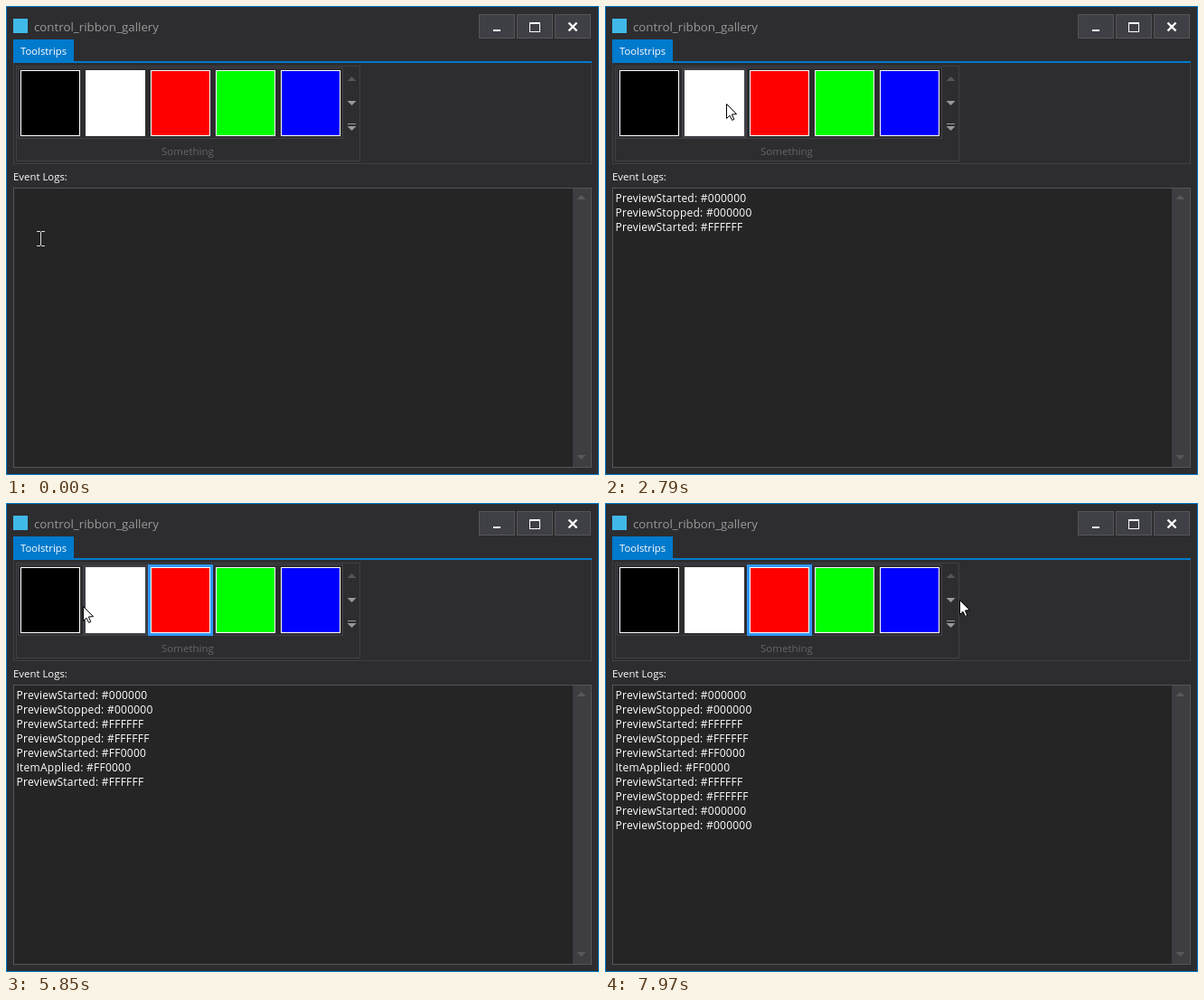
These frames come from a looping animation (656 by 519 pixels, 8000 ms). An HTML page with a canvas:

```html
<!DOCTYPE html>
<html lang="en">
<head>
<meta charset="utf-8">
<title>control_ribbon_gallery</title>
<style>
  html, body { margin: 0; width: 100%; height: 100%; overflow: hidden; background: #2d2d30; }
  canvas { display: block; }
</style>
</head>
<body>
<canvas id="stage" width="656" height="519"></canvas>
<script>
const ctx = document.getElementById('stage').getContext('2d');
const LOOP = 8000;
const BLUE = '#007acc', EDGE = '#3f3f46', BACK = '#2d2d30';
const SWATCHES = ['#000000', '#ffffff', '#ff0000', '#00ff00', '#0000ff'];
const APPLY_TIME = 3730, APPLIED = 2;

// Pointer moves: first step, last step, step count, end point, optional curve control
const START = { x: 38, y: 257 };
const MOVES = [
  { from: 620, to: 1060, steps: 12, x: 49, y: 114 },
  { from: 1660, to: 1980, steps: 9, x: 118, y: 107 },
  { from: 2170, to: 2170, steps: 1, x: 119, y: 108 },
  { from: 2630, to: 3080, steps: 12, x: 189, y: 109 },
  { from: 4140, to: 4140, steps: 1, x: 187, y: 109 },
  { from: 4320, to: 4970, steps: 17, x: 131, y: 110 },
  { from: 5570, to: 6170, steps: 16, x: 39, y: 117 },
  { from: 6590, to: 7370, steps: 18, x: 329, y: 248 },
  { from: 7410, to: 7970, steps: 15, x: 392, y: 107, control: { x: 445, y: 170 } }
];

// Log entries; hover is the swatch being previewed from then on
const EVENTS = [
  { at: 900, text: 'PreviewStarted: #000000', hover: 0 },
  { at: 1820, text: 'PreviewStopped: #000000', hover: -1 },
  { at: 1820, text: 'PreviewStarted: #FFFFFF', hover: 1 },
  { at: 2875, text: 'PreviewStopped: #FFFFFF', hover: -1 },
  { at: 2875, text: 'PreviewStarted: #FF0000', hover: 2 },
  { at: APPLY_TIME, text: 'ItemApplied: #FF0000', hover: 2 },
  { at: 4685, text: 'PreviewStarted: #FFFFFF', hover: 1 },
  { at: 5890, text: 'PreviewStopped: #FFFFFF', hover: -1 },
  { at: 5890, text: 'PreviewStarted: #000000', hover: 0 },
  { at: 6820, text: 'PreviewStopped: #000000', hover: -1 }
];

const ease = p => p * p * p * (p * (p * 6 - 15) + 10);

function pointerAt(time) {
  let pos = START;
  for (const move of MOVES) {
    if (time < move.from) break;
    const gap = (move.to - move.from) / (move.steps - 1) || 1;
    const step = Math.min(move.steps, Math.floor((time - move.from) / gap + 1e-6) + 1);
    const p = ease(step / move.steps), q = 1 - p;
    const c = move.control || { x: (pos.x + move.x) / 2, y: (pos.y + move.y) / 2 };
    const along = k => Math.round(q * q * pos[k] + 2 * p * q * c[k] + p * p * move[k]);
    pos = { x: along('x'), y: along('y') };
  }
  return pos;
}

function fill(x, y, w, h, color) {
  ctx.fillStyle = color;
  ctx.fillRect(x, y, w, h);
}

function outline(x, y, w, h, color, line = 1) {
  ctx.strokeStyle = color;
  ctx.lineWidth = line;
  ctx.strokeRect(x + line / 2, y + line / 2, w - line, h - line);
}

function label(text, x, y, size, color, spacing = 0) {
  ctx.font = `${size}px "Open Sans", "Noto Sans", sans-serif`;
  ctx.letterSpacing = `${spacing}px`;
  ctx.fillStyle = color;
  ctx.fillText(text, x, y);
}

function polygon(points, color, stroke) {
  ctx.beginPath();
  points.forEach(([x, y]) => ctx.lineTo(x, y));
  ctx.closePath();
  ctx.fillStyle = color;
  ctx.fill();
  if (stroke) {
    ctx.strokeStyle = stroke;
    ctx.lineWidth = 1;
    ctx.stroke();
  }
}

// Triangle with its base at y; a negative height points up
function triangle(x, y, height, color) {
  polygon([[x - 5, y], [x + 5, y], [x, y + height]], color);
}

function drawTitleBar() {
  fill(0, 0, 656, 519, BACK);
  outline(0, 0, 656, 519, BLUE);
  fill(8, 14, 16, 16, '#40b9e8');
  label('control_ribbon_gallery', 31, 28, 13.3, '#999999');
  for (const x of [523, 565, 607]) {
    fill(x, 9, 40, 27, EDGE);
    outline(x, 9, 40, 27, '#555558');
  }
  fill(539, 26, 8, 2, '#fff');
  outline(579, 18, 12, 11, '#fff');
  fill(579, 18, 12, 2, '#fff');
  ctx.strokeStyle = '#fff';
  ctx.lineWidth = 2.4;
  ctx.beginPath();
  ctx.moveTo(622.5, 18.5);
  ctx.lineTo(631.5, 27.5);
  ctx.moveTo(631.5, 18.5);
  ctx.lineTo(622.5, 27.5);
  ctx.stroke();
}

function drawRibbon(hover, applied) {
  outline(8, 62, 640, 113, EDGE);
  fill(8, 37, 67, 25, BLUE);
  fill(8, 61, 640, 2, BLUE);
  label('Toolstrips', 16, 54, 11.3, '#fff');
  outline(11, 66, 381, 106, EDGE);
  outline(13, 68, 360, 79, EDGE);
  SWATCHES.forEach((color, i) => {
    const x = 13 + i * 72;
    if (i === hover) fill(x, 68, 72, 79, EDGE);
    if (i === applied) outline(x, 68, 72, 79, '#3399ff', 3);
    fill(x + 3, 71, 66, 73, color);
    outline(x + 3, 71, 66, 73, '#fff');
  });
  triangle(382.5, 83, -5, '#555558');
  triangle(382.5, 105, 5, '#999999');
  fill(378, 130, 9, 1, '#999999');
  triangle(382.5, 133, 5, '#999999');
  label('Something', 172, 165, 11.5, '#656565');
}

function drawLog(lines) {
  label('Event Logs:', 8, 193, 11.4, '#fff');
  fill(8, 201, 640, 310, '#252526');
  fill(627, 202, 20, 308, '#3e3e42');
  outline(8, 201, 640, 310, '#555558');
  triangle(636.5, 214, -5, '#58585c');
  triangle(636.5, 497, 5, '#58585c');
  lines.forEach((line, i) => label(line.text, 11.5, 217 + i * 16, 12, '#fff', 0.25));
}

function drawPointer({ x, y }) {
  const overLog = y > 201 && y < 511 && x > 8 && x < 627;
  ctx.save();
  ctx.translate(x, y);
  if (overLog) {
    const ink = '#dadada';
    fill(0, -7, 1, 15, ink);
    for (const end of [-8, 8]) {
      fill(-4, end, 4, 1, ink);
      fill(1, end, 4, 1, ink);
    }
  } else {
    polygon([[0.5, 0.5], [0.5, 16.5], [4, 13.2], [6.6, 18.4], [8.8, 17.4], [6.4, 12], [11.5, 11.6]],
      '#fff', '#000');
  }
  ctx.restore();
}

function render(time) {
  const lines = EVENTS.filter(event => event.at <= time);
  const hover = lines.length ? lines[lines.length - 1].hover : -1;
  drawTitleBar();
  drawRibbon(hover, time >= APPLY_TIME ? APPLIED : -1);
  drawLog(lines);
  drawPointer(pointerAt(time));
}

const origin = performance.now();
function frame() {
  render((performance.now() - origin) % LOOP);
  requestAnimationFrame(frame);
}
frame();
</script>
</body>
</html>
```
